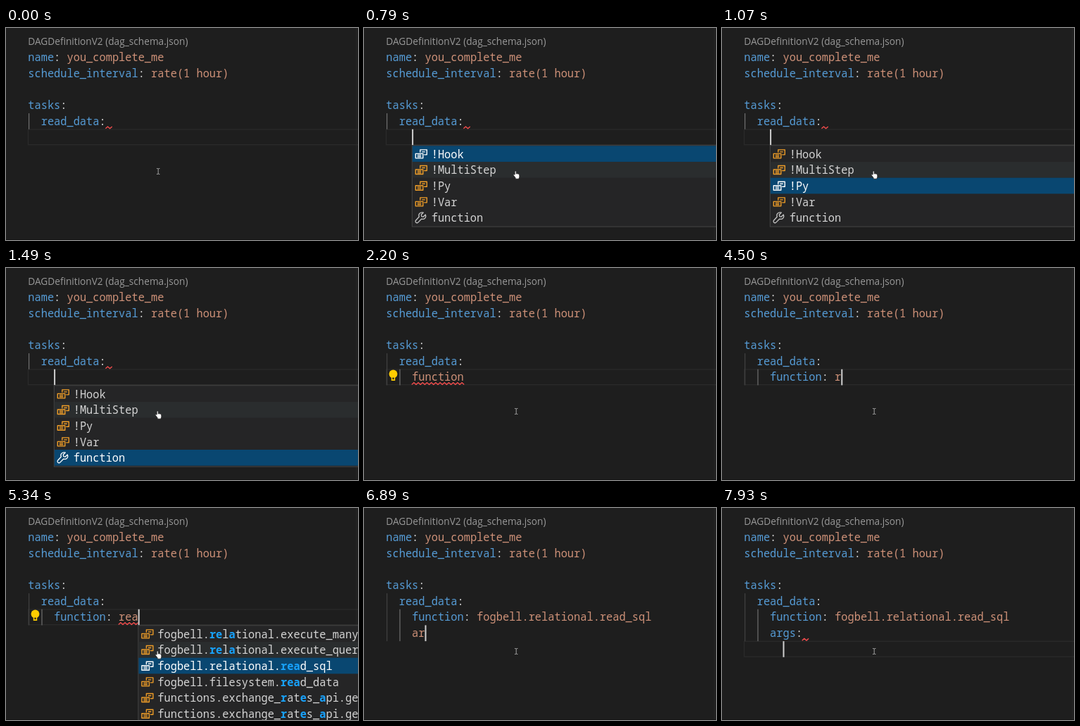
An HTML page for the animation above (8 s loop, 500 by 301 pixels).

```html
<!DOCTYPE html>
<html lang="en">
<head>
<meta charset="utf-8">
<title>Editor completion</title>
<style>
  html, body { margin: 0; width: 100%; height: 100%; overflow: hidden; background: #1e1e1e; }
  svg { display: block; width: 500px; height: 301px; }
  text { font: 500 15.33px "Noto Sans Mono", "DejaVu Sans Mono", monospace; fill: #d4d4d4; }
  .title { font: 13.66px "Open Sans", "Noto Sans", sans-serif; fill: #999; }
  .key { fill: #569cd6; }
  .value { fill: #ce9178; }
  .chosen { fill: #fff; }
  .match { fill: #18a3ff; font-weight: bold; }
</style>
</head>
<body>
<svg id="stage" viewBox="0 0 500 301"></svg>
<script>
const LOOP = 8000, CHAR = 9.2, ROW = 22.67;
const colX = col => 31.3 + col * CHAR;
const rowY = row => 30.4 + row * ROW;
const baseY = row => rowY(row) + 16.7;

const task = ['!Hook', '!MultiStep', '!Py', '!Var', 'function'];
const calls = [...task.slice(0, 4), 'functions.exchange_rates_api.get', 'functions.exchange_rates_api.get_history'];
const matches = [
  'fogbell.*re*l*a*tional.execute_many',
  'fogbell.*re*l*a*tional.execute_query',
  'fogbell.relational.*rea*d_sql',
  'fogbell.filesystem.*rea*d_data',
  'functions.exchange_*r*at*e*s_*a*pi.get',
  'functions.exchange_*r*at*e*s_*a*pi.get_history'
];
const args = ['*ar*gs', 'b*a*tch'];

// Each track lists [start time, value]; the value holds until the next start.
const tracks = {
  call: [[0, ''], [1630, 'function'], [2340, 'function:'], [4500, 'function: r'], [4640, 'function: re'],
    [4780, 'function: rea'], [5480, 'function: fogbell.relational.read_sql']],
  args: [[0, ''], [6750, 'a'], [6890, 'ar'], [7510, 'args:']],
  cursor: [[0, null], [80, [4, 5]], [1630, [12, 5]], [1920, null], [2340, [13, 5]], [2480, [14, 5]],
    [2920, null], [3340, [14, 5]], [3780, null], [4060, [14, 5]], [4210, null], [4500, [15, 5]],
    [4640, [16, 5]], [4780, [17, 5]], [5480, [41, 5]], [5910, [4, 6]], [6330, null], [6470, [4, 6]],
    [6750, [5, 6]], [6890, [6, 6]], [7510, [6, 7]]],
  // column, row, length
  squiggle: [[0, [12, 4, 1]], [1630, null], [1770, [4, 5, 8]], [2340, null], [2770, [14, 5, 1]],
    [4500, null], [4780, [14, 5, 3]], [5630, null], [7790, [9, 6, 1]]],
  bulb: [[0, false], [2200, true], [2770, false], [4920, true], [5480, false]],
  activeRow: [[0, 5], [5910, null], [7510, 7]],
  // items, column, row, selected
  popup: [[0, null], [500, [task, 4, 5, 0]], [930, [task, 4, 5, 1]], [1070, [task, 4, 5, 2]],
    [1210, [task, 4, 5, 3]], [1350, [task, 4, 5, 4]], [1630, null], [3640, [calls, 14, 5, 0]],
    [3920, [calls, 14, 5, 1]], [4060, [calls, 14, 5, 2]], [4210, null], [5060, [matches, 17, 5, 0]],
    [5200, [matches, 17, 5, 1]], [5340, [matches, 17, 5, 2]], [5480, null], [7090, [args, 6, 6, 0]],
    [7510, null]]
};
const at = (name, t) => tracks[name].filter(([start]) => start <= t).pop()[1];

const rect = (x, y, w, h, fill, more = '') =>
  `<rect x="${x}" y="${y}" width="${w}" height="${h}" fill="${fill}" ${more}/>`;
const path = (d, stroke, width = 1, fill = 'none') =>
  `<path d="${d}" stroke="${stroke}" stroke-width="${width}" stroke-linejoin="round" fill="${fill}"/>`;
const text = (x, y, content, cls = '') => `<text x="${x}" y="${y}" class="${cls}">${content}</text>`;

function code(col, row, line) {
  const [key, value] = line.includes(':') ? line.split(/: ?/) : ['', line];
  const put = (offset, str, cls) => str && text(colX(col + offset), baseY(row), str, cls);
  if (!key) return put(0, value, 'value');
  return put(0, key, 'key') + put(key.length, ':') + put(key.length + 2, value, 'value');
}

function squiggle([col, row, length]) {
  const x = colX(col) - 0.3, y = baseY(row), step = 3.1;
  const count = Math.round(length * CHAR / step);
  let d = `M${x} ${y + 5}`;
  for (let i = 1; i <= count; i++) d += `L${x + i * step} ${y + (i % 2 ? 2.2 : 5)}`;
  return path(d, '#f14c4c', 1.4);
}

const guide = (col, from, to, active) =>
  rect(colX(col) + 0.7, rowY(from), 1.2, (to - from) * ROW, active ? '#707070' : '#404040');

const bulb = () => '<circle cx="41.5" cy="150.5" r="5.9" fill="#fc0"/>' +
  rect(38.8, 153, 5.4, 7, '#fc0') + rect(40.4, 155.6, 2.2, 2.6, '#1e1e1e');

const enumIcon = (x, y, color) =>
  path(`M${x + 7} ${y - 2.5}V${y - 6.5}H${x + 16.5}V${y + 0.5}H${x + 12.5}M${x + 9.5} ${y - 3.5}h4.5` +
    `M${x + 0.5} ${y - 1}h10.5v6.5h-10.5zM${x + 3} ${y + 1.2}h5.5M${x + 3} ${y + 3.4}h5.5`, color, 1.4);

const wrench = (x, y, color) =>
  path(`M${x + 14.5} ${y - 5}l-3 3l-2.5 -.5l-.5 -2.5l3 -3c-5 -1 -7.5 2.5 -6 6l-5 5.5` +
    `c-1 2 1.5 4 3.2 2.8l5.3 -5.3c4 1.5 7 -2 5.5 -6z`, color, 1.3);

function popup([items, col, row, selected]) {
  const x = colX(col) + 0.2, top = rowY(row + 1) + 0.3;
  let out = rect(x, top, 520, items.length * ROW + 2, '#252526', 'stroke="#454545"');
  items.forEach((item, i) => {
    const y = top + 0.6 + i * ROW, mid = y + ROW / 2 + 0.7, chosen = i === selected;
    const hovered = row === 5 && i === 1;
    if (chosen || hovered) out += rect(x + 0.5, y, 500, ROW, chosen ? '#094771' : '#2a2d2e');
    const isProperty = items === args || item === 'function';
    const color = chosen ? '#fff' : isProperty ? '#c5c5c5' : '#ee9d28';
    out += (isProperty ? wrench : enumIcon)(x + 4.5, mid, color);
    const label = item.split('*').map((s, n) => n % 2 ? `<tspan class="match">${s}</tspan>` : s).join('');
    out += text(x + 27.4, mid + 5.3, label, chosen ? 'chosen' : '');
  });
  return out;
}

const hand = () => path('M215 212.5l-2.5 -3.2c-.8 -1.6 .8 -2.2 1.7 -.9v-4.2c0 -1.7 2 -1.7 2 0v2.8' +
  'c2 -.5 4.6 .2 4.6 2v2.6l-1 2.6h-4.5z', '#222', 0.8, '#fff');
const beam = () => path('M214 199.5h1.4l.8 .6l.8 -.6h1.4M216.2 200v7M214 207.5h1.4l.8 -.6l.8 .6h1.4', '#b0b0b0', 0.9);

function draw(t) {
  const call = at('call', t), arg = at('args', t), list = at('popup', t);
  const cursor = at('cursor', t), wave = at('squiggle', t), active = at('activeRow', t);
  let out = rect(0, 0, 500, 301, '#1e1e1e') + rect(497, 0, 1, 300, '#252525') + rect(0, 300, 500, 1, '#141414');
  if (active) {
    out += rect(31.5, rowY(active) + 0.3, 480, ROW - 1, 'none', 'stroke="#2a2a2a" stroke-width="1.4"');
  }
  const end = arg ? 7 : call ? 6 : 5;
  out += guide(0, 4, end, !call);
  if (call) out += guide(2, 5, end, true);
  out += text(31.3, 24, 'DAGDefinitionV2 (dag_schema.json)', 'title');
  out += code(0, 0, 'name: you_complete_me') + code(0, 1, 'schedule_interval: rate(1 hour)');
  out += code(0, 3, 'tasks:') + code(2, 4, 'read_data:') + code(4, 5, call) + code(4, 6, arg);
  if (wave) out += squiggle(wave);
  if (at('bulb', t)) out += bulb();
  if (cursor) out += rect(colX(cursor[0]), rowY(cursor[1]), 2, ROW, '#d0d0d0');
  if (list) out += popup(list);
  return out + (list ? hand() : beam());
}

const stage = document.getElementById('stage');
let shown = '';
function tick() {
  const next = draw(performance.now() % LOOP);
  if (next !== shown) stage.innerHTML = shown = next;
  requestAnimationFrame(tick);
}
tick();
</script>
</body>
</html>
```
